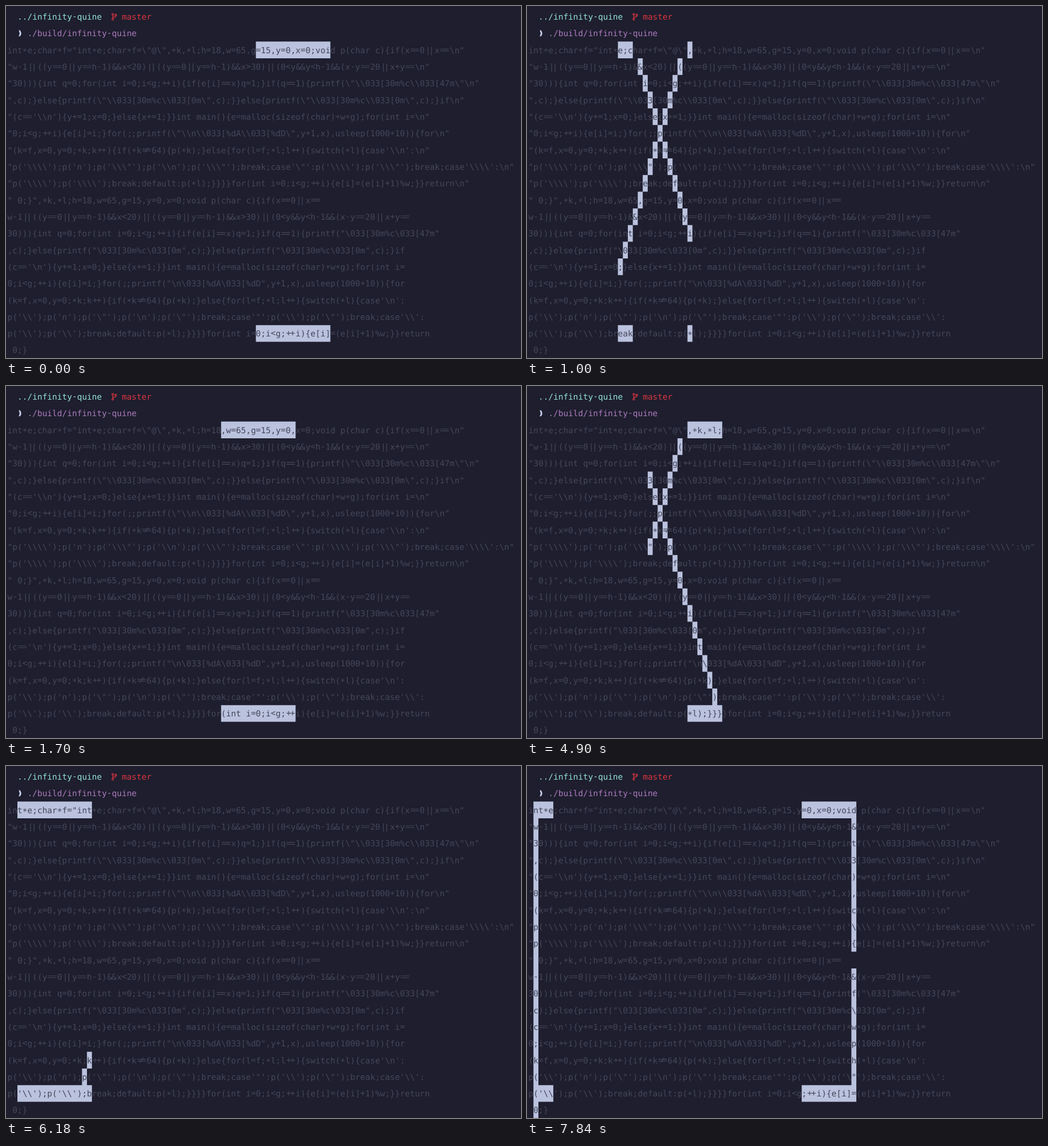
Animation, 904 px wide and 619 px high, one loop 8 s. Source, as an HTML page:

```html
<!DOCTYPE html>
<html lang="en">
<head>
<meta charset="utf-8">
<title>Infinity quine</title>
<style>
  html, body { margin: 0; width: 100%; height: 100%; overflow: hidden; background: #1e1e2e; }
  svg { display: block; }
  text {
    font: 14.5px "DejaVu Sans Mono", "Noto Sans Mono", monospace;
    white-space: pre;
    text-rendering: geometricPrecision;
  }
  #glow { fill: #bac2de; }
  #code { fill: #45475a; }
  #joins { fill: none; stroke: #45475a; stroke-width: 1.15; }
  .branch { fill: none; stroke: #d9373f; stroke-width: 1.3; }
</style>
</head>
<body>
<svg width="904" height="619" viewBox="0 0 904 619">
  <path id="glow"/>
  <g id="code"></g>
  <path id="joins"/>
  <g id="head"></g>
  <g class="branch">
    <circle cx="187.4" cy="14.7" r="1.5"/>
    <circle cx="187.4" cy="23.3" r="1.5"/>
    <circle cx="192.6" cy="16" r="1.5"/>
    <path d="M187.4 16.2V21.8M192.6 17.5Q192.6 19.4 190 19.7Q187.4 20 187.4 21.8"/>
  </g>
  <path fill="#cdd6f4" d="M22.2 42.8h2.4Q29 48 24.6 53.2h-2.4Q25.6 48 22.2 42.8z"/>
</svg>
<script>
const LEFT = 2.6, TOP = 62.6, CELL = 8.72, LINE = 29.333, BASE = 19.9;
const W = 65, H = 18, GLOW = 15, LOOP = 8000;
const $ = id => document.getElementById(id);

// The program prints itself twice: once escaped inside its string, once plain.
const plain = String.raw`w-1||((y==0||y==h-1)&&x<20)||((y==0||y==h-1)&&x>30)||(0<y&&y<h-1&&(x-y==20||x+y==
30))){int q=0;for(int i=0;i<g;++i){if(e[i]==x)q=1;}if(q==1){printf("\033[30m%c\033[47m"
,c);}else{printf("\033[30m%c\033[0m",c);}}else{printf("\033[30m%c\033[0m",c);}if
(c=='\n'){y+=1;x=0;}else{x+=1;}}int main(){e=malloc(sizeof(char)*w*g);for(int i=
0;i<g;++i){e[i]=i;}for(;;printf("\n\033[%dA\033[%dD",y+1,x),usleep(1000*10)){for
(k=f,x=0,y=0;*k;k++){if(*k!=64){p(*k);}else{for(l=f;*l;l++){switch(*l){case'\n':
p('\\');p('n');p('\"');p('\n');p('\"');break;case'"':p('\\');p('\"');break;case'\\':
p('\\');p('\\');break;default:p(*l);}}}}for(int i=0;i<g;++i){e[i]=(e[i]+1)%w;}}return`.split("\n");
const setup = ",*k,*l;h=18,w=65,g=15,y=0,x=0;void p(char c){if(x==0||x==";
const quoted = s => '"' + s.replace(/[\\"]/g, "\\$&") + '\\n"';
const rows = [
  String.raw`int*e;char*f="int*e;char*f=\"@\"` + setup + '\\n"',
  ...plain.map(quoted),
  '" 0;}"' + setup,
  ...plain,
  " 0;}"
];

// Operators sit on the middle line; some pairs move closer together.
const lift = { "*": 2.1, "=": -0.7, "+": -0.7, "<": -0.7, ">": -0.7, "-": -1.3 };
const squeeze = { "||": 1.3, "++": 0.9, "&&": 0.4, ";;": 0.9 };
let joins = "";

function addLine(parent, str, col, row, fill) {
  const base = TOP + row * LINE + BASE;
  const xs = [...str].map((_, i) => LEFT + (col + i) * CELL);
  for (const m of str.matchAll(/\|\||\+\+|&&|;;/g)) {
    xs[m.index] += squeeze[m[0]];
    xs[m.index + 1] -= squeeze[m[0]];
  }
  const shown = str.replace(/[=!]=/g, (op, i) => {
    const x = xs[i] + 1.2;
    for (const up of [6.8, 3.6]) joins += `M${x} ${base - up}h15`;
    if (op === "!=") joins += `M${x + 4.5} ${base - 0.8}l6 -8.8`;
    return "  ";
  });
  const el = document.createElementNS("http://www.w3.org/2000/svg", "text");
  el.setAttribute("x", xs.map(x => x.toFixed(2)).join(" "));
  el.setAttribute("y", [...str].map(c => (base + (lift[c] || 0)).toFixed(2)).join(" "));
  if (fill) el.setAttribute("fill", fill);
  el.textContent = shown;
  parent.append(el);
}

addLine($("head"), "../infinity-quine", 2, -2, "#94e2d5");
addLine($("head"), "master", 23, -2, "#d9373f");
addLine($("head"), "./build/infinity-quine", 4, -1, "#ac7bbd");
rows.forEach((s, y) => addLine($("code"), s, 0, y));
$("joins").setAttribute("d", joins);

// [time, first lit column]
const ramp = (t0, t1, n, a, b) => Array.from({ length: n }, (_, i) => {
  const k = i / (n - 1);
  return [Math.round((t0 + k * (t1 - t0)) / 20) * 20, Math.round(a + k * (b - a))];
});
const steps = [
  [0, 49],
  ...ramp(680, 1000, 9, 7, 17),
  ...ramp(1100, 1420, 8, 21, 32),
  ...ramp(1520, 1700, 6, 36, 42),
  [4900, 23], [5200, 34], [5480, 42], [5740, 50], [6000, 58], [6180, 1],
  [6440, 9], [6720, 17], [7000, 26], [7280, 36], [7560, 46], [7840, 54]
];

function onOutline(x, y) {
  if (x === 0 || x === W - 1) return true;
  if (y === 0 || y === H - 1) return x < 20 || x > 30;
  return y < H - 1 && (x - y === 20 || x + y === 30);
}

function glowPath(start) {
  let d = "";
  rows.forEach((s, y) => {
    const lit = x => x < W && x + 1 < s.length && onOutline(x, y) && (x - start + W) % W < GLOW;
    for (let x = 0; x < W; x++) {
      if (!lit(x)) continue;
      const from = x;
      while (lit(x + 1)) x++;
      const w = (x - from + 1) * CELL;
      d += `M${LEFT + (from + 1) * CELL} ${TOP + y * LINE}h${w}v${LINE}h${-w}z`;
    }
  });
  return d;
}

let current = -1;
function draw() {
  const t = performance.now() % LOOP;
  const start = steps.findLast(s => s[0] <= t)[1];
  if (start !== current) $("glow").setAttribute("d", glowPath(current = start));
  requestAnimationFrame(draw);
}
draw();
</script>
</body>
</html>
```
